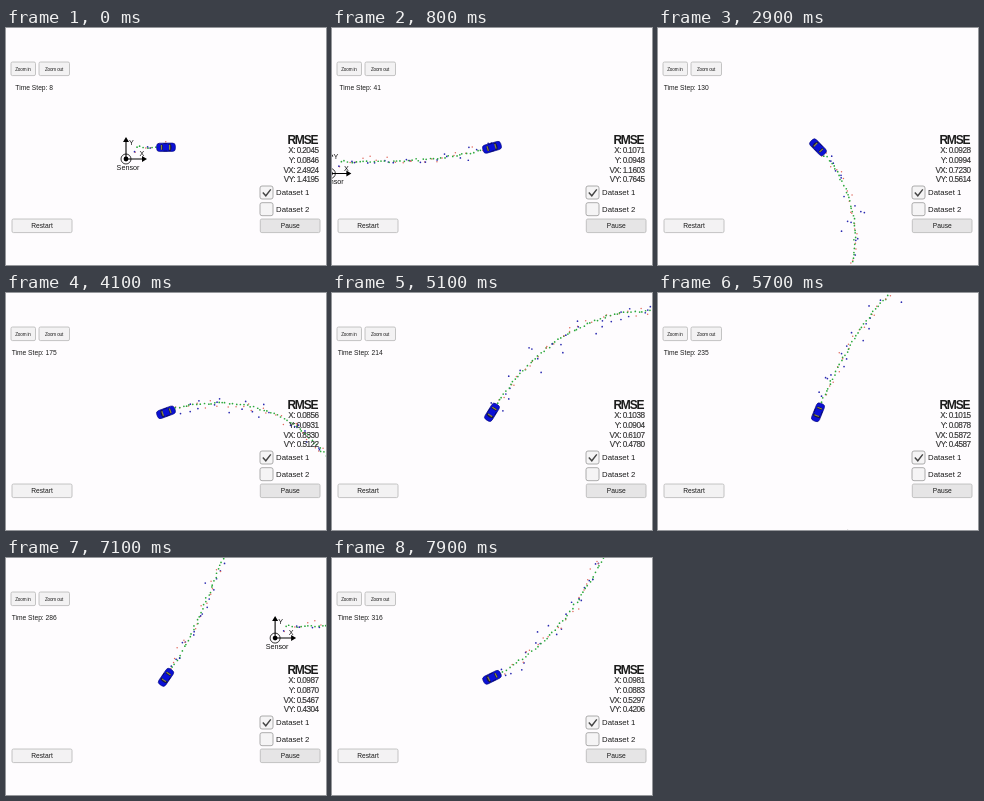
An HTML page for the animation above (8 s loop, 320 by 237 pixels).

```html
<!DOCTYPE html>
<html lang="en">
<head>
<meta charset="utf-8">
<title>Tracking simulator</title>
<style>
  html, body { margin: 0; width: 100%; height: 100%; overflow: hidden; background: #fefcfe; }
  svg { display: block; width: 100vw; height: 100vh; font-family: "Liberation Sans", Arial, sans-serif; fill: #1c1c1c; }
  .button { fill: #f3f2f3; stroke: #b5b5b5; stroke-width: .8; }
  .pressed { fill: #e6e5e6; }
  .box { fill: #f5f4f5; stroke: #999; stroke-width: .8; }
  .mid { text-anchor: middle; }
  .small { font-size: 4.6px; letter-spacing: -.15px; }
  .label { font-size: 6.7px; }
  .axis { font-size: 7.2px; }
  .option { font-size: 7.8px; }
  .title { font-size: 12px; font-weight: bold; letter-spacing: -1.2px; }
  .value { font-size: 8.2px; letter-spacing: -.55px; text-anchor: end; fill: #333; stroke: #333; stroke-width: .15px; }
</style>
</head>
<body>
<svg viewBox="0 0 320 237" xmlns="http://www.w3.org/2000/svg">
  <g id="world">
    <g id="dots"></g>
    <g id="sensor" stroke="#000" fill="none">
      <circle r="5" stroke-width=".8"/>
      <circle r="2.4" fill="#000" stroke="none"/>
      <path d="M0 0V-18M0 0H17" stroke-width="1.1"/>
      <path d="M0-22l-3 5h6zM21 0l-5-3v6z" fill="#000" stroke="none"/>
      <g fill="#111" stroke="none" class="mid axis">
        <text x="5.5" y="-14.5">Y</text>
        <text x="16" y="-2.8">X</text>
        <text x="2" y="11">Sensor</text>
      </g>
    </g>
  </g>
  <g id="car">
    <rect x="-9.4" y="-4.2" width="18.8" height="8.4" rx="3" fill="#0a10d6" stroke="#06087c" stroke-width=".6"/>
    <path d="M2.2-3.4q2.6 3.4 0 6.8l2.3.4q2.2-3.8 0-7.6z" fill="#15164a"/>
    <path d="M-5-3l1.8.4v5.2L-5 3q-1.4-3 0-6z" fill="#15164a"/>
    <path d="M3.6-2.4v4.8M-4.5-2.4v4.8" stroke="#8c8a3c" stroke-width="1.2" fill="none"/>
    <path d="M-2.6-3.7h4M-2.6 3.7h4" stroke="#06086a" stroke-width=".8"/>
  </g>
  <g id="ui">
    <g class="mid small">
      <rect class="button" x="5" y="34" width="24.5" height="13.6" rx="1.5"/>
      <text x="17" y="42.7">Zoom in</text>
      <rect class="button" x="33" y="34" width="30.5" height="13.6" rx="1.5"/>
      <text x="48" y="42.7">Zoom out</text>
    </g>
    <g class="mid label">
      <text id="step" x="28.2" y="61.8"></text>
      <rect class="button" x="6" y="191" width="60" height="13.6" rx="1.5"/>
      <text x="36" y="200.4">Restart</text>
      <rect class="button pressed" x="254.3" y="191" width="59.7" height="13.6" rx="1.5"/>
      <text x="284.3" y="200.4">Pause</text>
    </g>
    <g class="option">
      <rect class="box" x="254" y="158" width="13" height="13" rx="2"/>
      <path d="M256.8 164.6l3 3.2 5-6.4" fill="none" stroke="#444" stroke-width="1.4"/>
      <text x="270" y="167">Dataset 1</text>
      <rect class="box" x="254" y="174.7" width="13" height="13" rx="2"/>
      <text x="270" y="183.8">Dataset 2</text>
    </g>
    <text class="title" x="281.4" y="115.5">RMSE</text>
    <g id="values"></g>
  </g>
</svg>
<script>
const NS = "http://www.w3.org/2000/svg";
const $ = id => document.getElementById(id);
const add = (parent, tag, attrs) => {
  const el = document.createElementNS(NS, tag);
  for (const key in attrs) el.setAttribute(key, attrs[key]);
  return parent.appendChild(el);
};

const LOOP = 8000, TICK = 100, LAST = 316;
const CAR = { x: 160, y: 119.3 };
const SWING = 2.18, PERIOD = 496;

// Each row: time, step, then the RMSE of X, Y, VX, VY
const KEYS = [
  [0, 8, .2045, .0846, 2.4924, 1.4195],
  [1700, 79, .0855, .0970, .8656, .6196],
  [2900, 130, .0928, .0994, .7230, .5614],
  [4100, 175, .0856, .0931, .8330, .5122],
  [5100, 214, .1038, .0904, .6107, .4780],
  [6300, 256, .0995, .0855, .5666, .4418],
  [7900, 316, .0981, .0883, .5297, .4206]
];
const NAMES = ["X", "Y", "VX", "VY"];

let seed = 41;
const random = () => (seed = (seed * 16807) % 2147483647) / 2147483647;
const noise = size => (random() + random() + random() - 1.5) * 2 * size;

// The car weaves: heading swings as a cosine, and speed dips while it turns left
const phase = k => 2 * Math.PI * k / PERIOD;
const heading = k => SWING * (1 - Math.cos(phase(k)));
const speed = k => 3.8 - .25 * Math.sin(phase(k));
const path = [{ x: 0, y: 0 }];
for (let k = 0; k < LAST; k++) {
  const a = heading(k + .5), v = speed(k + .5), p = path[k];
  path.push({ x: p.x + v * Math.cos(a), y: p.y - v * Math.sin(a) });
}
const sensor = { x: path[8].x - 40, y: path[8].y + 11.7 };
$("sensor").setAttribute("transform", `translate(${sensor.x} ${sensor.y})`);

const dot = (x, y, r, fill) => add($("dots"), "circle", { cx: x, cy: y, r, fill });

// Red lidar and blue radar readings alternate; green marks the estimate
const marks = path.map((p, k) => {
  const range = Math.hypot(p.x - sensor.x, p.y - sensor.y);
  const bearing = Math.atan2(p.y - sensor.y, p.x - sensor.x);
  let reading;
  if (k % 2) {
    const r = range + noise(4), b = bearing + noise(.028);
    reading = dot(sensor.x + r * Math.cos(b), sensor.y + r * Math.sin(b), .85, "#2a2ab0");
  } else {
    reading = dot(p.x + noise(2.2), p.y + noise(2.2), .75, "#e0685c");
  }
  return [reading, dot(p.x + noise(.6), p.y + noise(.6), .85, "#2aa83a")];
});

const values = NAMES.map((_, i) =>
  add($("values"), "text", { class: "value", x: 312.4, y: 125.2 + i * 9.65 }));

const mix = (a, b, u) => a + (b - a) * u;

function draw(time) {
  const t = Math.floor(time / TICK) * TICK;
  let i = 0;
  while (i < KEYS.length - 2 && t >= KEYS[i + 1][0]) i++;
  const a = KEYS[i], b = KEYS[i + 1];
  const k = Math.round(mix(a[1], b[1], (t - a[0]) / (b[0] - a[0])));

  // Errors settle with the inverse root of the sample count
  const root = n => 1 / Math.sqrt(n);
  const u = (root(k) - root(a[1])) / (root(b[1]) - root(a[1]));
  values.forEach((el, n) => {
    el.textContent = `${NAMES[n]}: ${mix(a[n + 2], b[n + 2], u).toFixed(4)}`;
  });

  const p = path[k];
  $("world").setAttribute("transform", `translate(${CAR.x - p.x} ${CAR.y - p.y})`);
  $("car").setAttribute("transform",
    `translate(${CAR.x} ${CAR.y}) rotate(${-heading(k) * 180 / Math.PI})`);
  $("step").textContent = `Time Step: ${k}`;
  marks.forEach((pair, n) => pair.forEach(el =>
    el.setAttribute("visibility", n <= k ? "visible" : "hidden")));
}

const start = performance.now();
function loop() {
  draw((performance.now() - start) % LOOP);
  requestAnimationFrame(loop);
}
loop();
</script>
</body>
</html>
```
